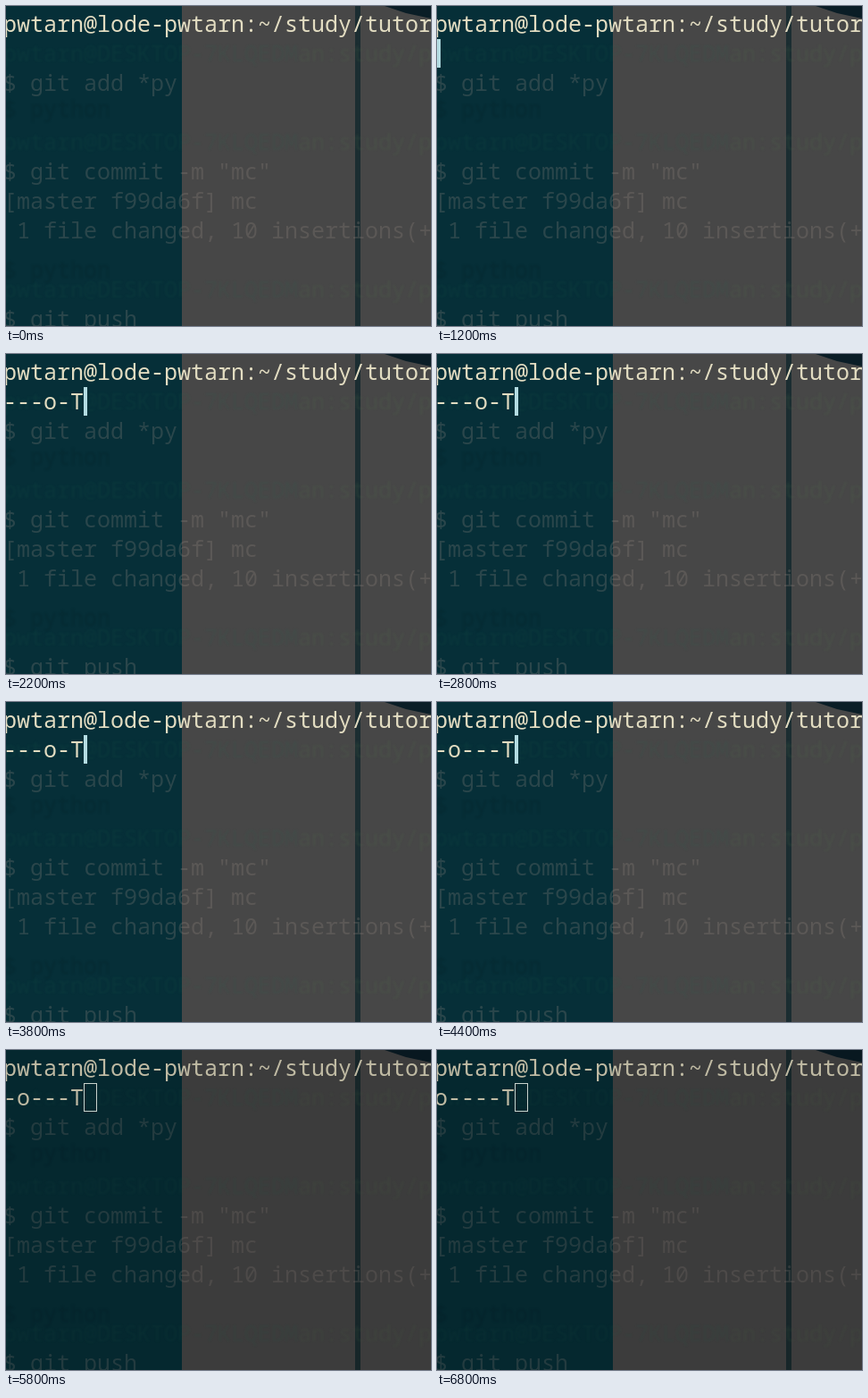
These frames come from a looping animation (476 px wide and 358 px high, 8 s). An HTML page:

```html
<!DOCTYPE html>
<html lang="en">
<head>
<meta charset="utf-8">
<title>Terminal walk</title>
<style>
  html, body { margin: 0; width: 100%; height: 100%; overflow: hidden; background: #062f38; }
  svg { display: block; width: 476px; height: 358px; }
  text { font: 25px "Noto Sans Mono", "DejaVu Sans Mono", monospace; white-space: pre; }
  .lit { fill: #e2dcc1; }
  .old { fill: rgba(150, 140, 130, .25); }
  .green { fill: rgba(30, 105, 85, .12); filter: blur(.8px); }
  .leaf { fill: rgba(85, 120, 75, .17); filter: blur(.8px); }
  .dark { fill: rgba(0, 8, 14, .1); filter: blur(.8px); }
  /* the window loses focus */
  .blur { animation: show 8s step-end infinite; }
  .focus { animation: hide 8s step-end infinite; }
  @keyframes show { 0% { visibility: hidden } 70%, 100% { visibility: visible } }
  @keyframes hide { 0% { visibility: hidden } 15% { visibility: visible } 70%, 100% { visibility: hidden } }
</style>
</head>
<body>
<svg viewBox="0 0 476 358">
  <rect width="197" height="358" fill="#062f38"/>
  <rect x="197" width="279" height="358" fill="#474747"/>
  <rect x="391" width="6" height="358" fill="#1b2d31"/>
  <path d="M424 0H476V14L448 8L436 4Z" fill="#0a1d26"/>
  <g id="ghosts"></g>
  <g id="history"></g>
  <text class="lit" x="-3" y="29">pwtarn@lode-pwtarn:~/study/tutor</text>
  <text class="lit" id="walk" x="-3" y="62"></text>
  <rect class="focus" id="bar" x="87" y="37" width="4" height="32" fill="#b4dce2"/>
  <rect class="blur" width="476" height="358" fill="#000" opacity=".155"/>
  <rect class="blur" x="87.5" y="37.5" width="14" height="31" fill="none" stroke="#c9d3cd"/>
</svg>
<script>
  const LOOP = 8000, LEFT = -3, CELL = 15, LINE = 33, FIRST = 29;
  const $ = id => document.getElementById(id);

  function put(parent, cls, x, y, str) {
    const t = document.createElementNS("http://www.w3.org/2000/svg", "text");
    t.setAttribute("class", cls);
    t.setAttribute("x", x);
    t.setAttribute("y", y);
    t.textContent = str;
    parent.append(t);
  }

  const history = {
    2: "$ git add *py",
    5: '$ git commit -m "mc"',
    6: "[master f99da6f] mc",
    7: " 1 file changed, 10 insertions(+",
    10: "$ git push"
  };
  for (const row in history) put($("history"), "old", LEFT, FIRST + row * LINE, history[row]);

  // faint text shining through from the window behind
  for (const row of [1, 4, 9]) {
    const y = FIRST + row * LINE;
    put($("ghosts"), "green", LEFT, y, "pwtarn@DESKTOP-7KLQEDM");
    put($("ghosts"), "leaf", 327, y, "an:study/p");
  }
  for (const y of [124, 304]) put($("ghosts"), "dark", LEFT, y, "$ python");

  // [start time, cell of the walker]; -1 is an empty line
  const steps = [
    [1200, -1], [1400, 0], [1600, 1], [1800, 2], [2200, 3], [2400, 2], [2800, 3],
    [3200, 4], [3600, 3], [4000, 2], [4400, 1], [4600, 0], [5000, 1],
    [5400, 2], [5600, 1], [6000, 0], [6200, 1], [6800, 0]
  ];

  function draw(now) {
    const t = now % LOOP;
    let pos = -1;
    for (const [start, cell] of steps) if (t >= start) pos = cell;
    const line = pos < 0 ? "" : "-".repeat(pos) + "o" + "-".repeat(4 - pos) + "T";
    if ($("walk").textContent !== line) $("walk").textContent = line;
    $("bar").setAttribute("x", Math.max(0, LEFT + line.length * CELL));
    requestAnimationFrame(draw);
  }

  // keep the CSS clock and the script on one timeline
  for (const a of document.getAnimations()) a.startTime = 0;
  draw(performance.now());
</script>
</body>
</html>
```
